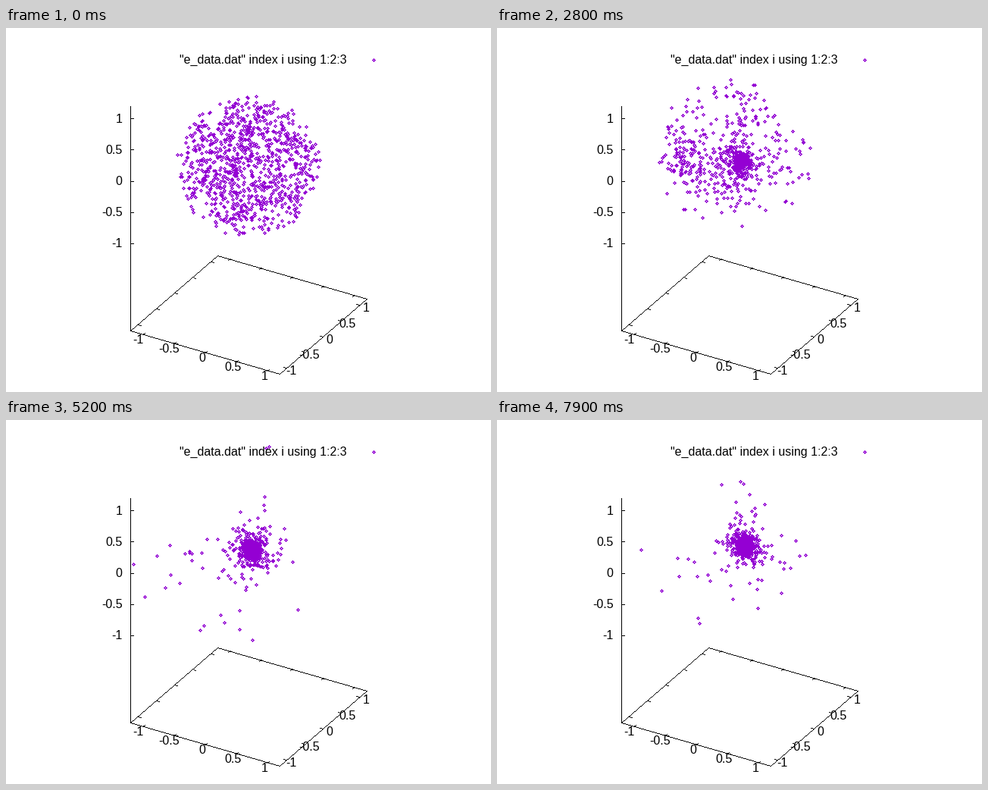
Animation, 640 px wide and 480 px high, one loop 8000 ms. Source, as a matplotlib script:

```python
import numpy as np
import matplotlib.pyplot as plt
from matplotlib.animation import FuncAnimation

W, H, DPI = 640, 480, 100
FRAMES, INTERVAL = 80, 100
N, SEED = 1000, 11
EPS2 = (1 / 32) ** 2
FRAME_DT, SUBSTEPS = 0.054, 6
LIMIT = 1.2
BLACK = (0, 0, 0, 255)
PURPLE = (0x94, 0x00, 0xD3, 255)
TICKS = (-1, -0.5, 0, 0.5, 1)
MINUS_WIDTH = 5.3

# Screen vectors of the unit axes: view 60, 30
CENTRE = np.array([320.0, 180.7])
EX = np.array([82.0, 24.0])
EY = np.array([48.1, -41.4])
EZ = np.array([0.0, -82.3])
FLOOR = np.array([0.0, 197.3])


def project(p):
    return CENTRE + p @ np.array([EX, EY, EZ])


def floor_point(x, y):
    return CENTRE + FLOOR + x * EX + y * EY


def gravity(p):
    sq = (p * p).sum(1)
    d = p @ p.T
    d *= -2
    d += sq[:, None]
    d += sq + np.float32(EPS2)
    np.maximum(d, np.float32(EPS2), out=d)
    d *= np.sqrt(d)
    np.reciprocal(d, out=d)
    return (d @ p - p * d.sum(1)[:, None]) / np.float32(N)


def collapse():
    """Cold uniform sphere falling in on itself, one snapshot per frame."""
    rng = np.random.default_rng(SEED)
    mirror = np.array([-1, 1, 1])  # throws the ejecta to the upper right
    p = rng.normal(size=(N, 3)) * mirror
    p *= (rng.random(N) ** (1 / 3) / np.linalg.norm(p, axis=1))[:, None]
    v = rng.normal(scale=0.05, size=(N, 3)) * mirror
    p = (p - p.mean(0)).astype(np.float32)
    v = (v - v.mean(0)).astype(np.float32)
    dt = np.float32(FRAME_DT / SUBSTEPS)
    a = gravity(p)
    shots = []
    for k in range(FRAMES):
        # the dense core drifts slowly upwards after the bounce
        drift = np.array([0.06, 0.0, 0.16]) * (k - 20) / 59 + [0, 0, 0.04]
        pull = np.clip((k - 20) / 8, 0, 1)
        shots.append(p + pull * (drift - np.median(p, axis=0)))
        for _ in range(SUBSTEPS):
            v = v + a * (dt / 2)
            p = p + v * dt
            a = gravity(p)
            v = v + a * (dt / 2)
    return shots


shots = collapse()

fig = plt.figure(figsize=(W / DPI, H / DPI), dpi=DPI, facecolor="white")
ax = fig.add_axes([0, 0, 1, 1])
base = np.zeros((H, W, 4), np.uint8)
layer = ax.imshow(base, interpolation="nearest", aspect="auto", zorder=3)
ax.axis("off")


def line(start, end):
    """Hard-edged line, one pixel wide."""
    a, b = np.rint(start), np.rint(end)
    n = int(np.abs(b - a).max()) + 1
    x, y = np.rint(np.linspace(a, b, n)).astype(int).T
    base[y, x] = BLACK


def label(x, y, text, ha="center"):
    ax.text(x, y + 5, text, ha=ha, va="baseline", color="black",
            family="Liberation Sans", fontsize=16 * 72 / DPI, zorder=4)


def floor_label(point, dx, dy, value):
    # the digits are centred and a minus sign hangs out to the left
    hang = MINUS_WIDTH / 2 if value < 0 else 0
    label(point[0] + dx - hang, point[1] + dy, f"{value:g}")


def draw_axes():
    corners = [floor_point(x * LIMIT, y * LIMIT)
               for x, y in ((-1, -1), (1, -1), (1, 1), (-1, 1))]
    for i in range(4):
        line(corners[i - 1], corners[i])
    origin = corners[0] - FLOOR
    line(corners[0], origin + LIMIT * EZ)
    tx, ty = EX * 0.052, EY * 0.052
    for t in TICKS:
        front, back = floor_point(t, -LIMIT), floor_point(t, LIMIT)
        line(front, front + ty)
        line(back, back - ty)
        floor_label(front, -4, 7, t)
        near, far = floor_point(LIMIT, t), floor_point(-LIMIT, t)
        line(near, near - tx)
        line(far, far + tx)
        floor_label(near, 8, 3.5, t)
        mark = origin + t * EZ
        line(mark, mark + [4, 0])
        label(153, mark[1], f"{t:g}", "right")


draw_axes()
label(449, 41, '"e_data.dat" index i using 1:2:3', "right")

# Small diamond with an open centre
DIAMOND = [(dx, dy) for dx in range(-2, 3) for dy in range(-2, 3)
           if 1 <= abs(dx) + abs(dy) <= 2]


def update(k):
    p = shots[k]
    shown = p[(np.abs(p) <= LIMIT).all(1)]
    xy = np.vstack([np.rint(project(shown)), [[485, 42]]]).astype(int)
    canvas = base.copy()
    for dx, dy in DIAMOND:
        canvas[xy[:, 1] + dy, xy[:, 0] + dx] = PURPLE
    layer.set_data(canvas)
    return (layer,)


anim = FuncAnimation(fig, update, frames=FRAMES, interval=INTERVAL,
                     repeat=True, repeat_delay=0, blit=False)
plt.show()
```
